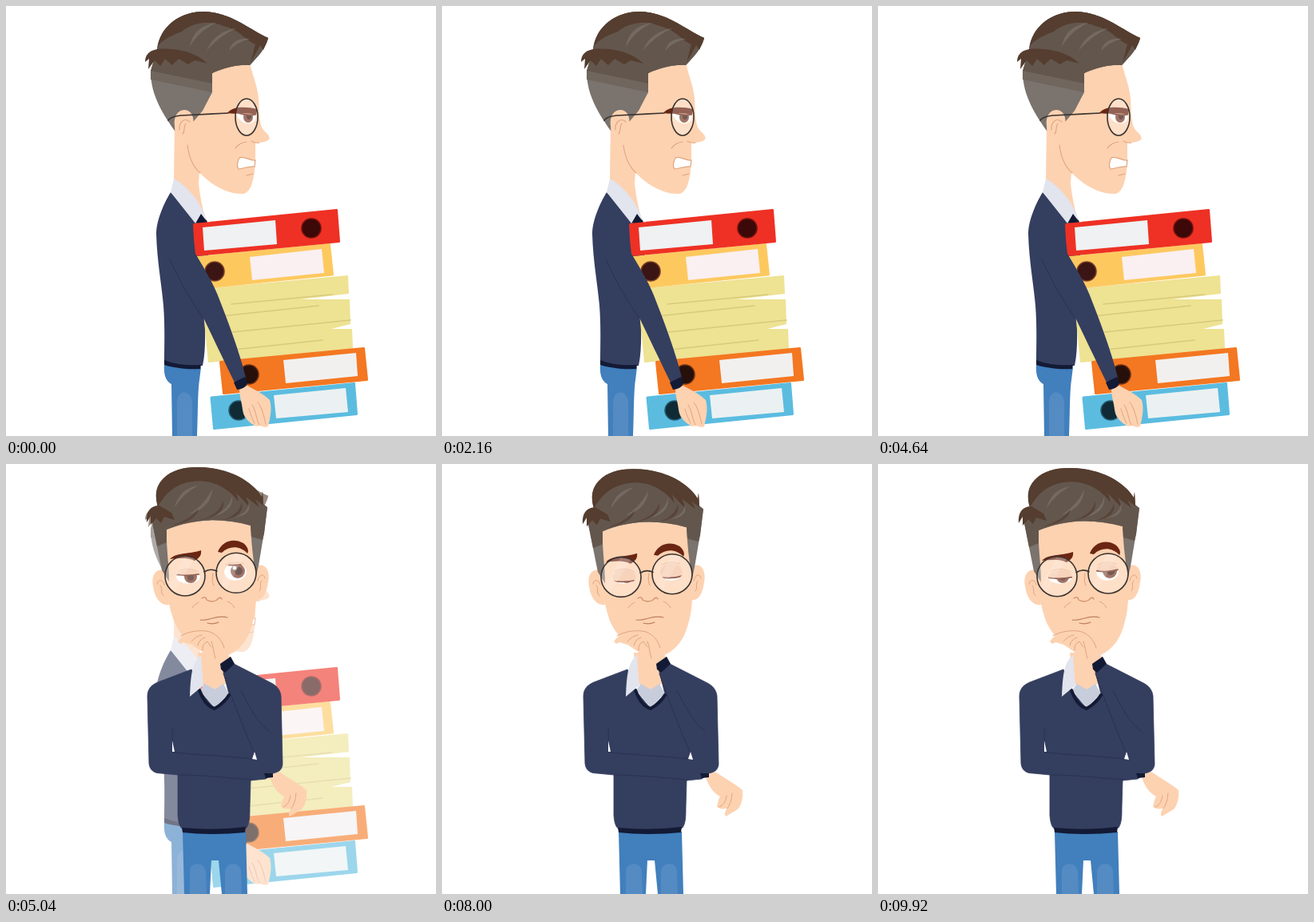
Write an HTML page that moves like this. It is 538 by 538 pixels and loops after 10 s.

```html
<!DOCTYPE html>
<html lang="en">
<head>
<meta charset="utf-8">
<title>Office worker</title>
<style>
html, body { margin: 0; width: 100%; height: 100%; overflow: hidden; background: #fff; }
svg { display: block; width: 100%; height: 100%; }
.line { fill: none; stroke-linecap: round; stroke-linejoin: round; }
</style>
</head>
<body>
<svg id="stage" viewBox="0 0 538 538"></svg>
<script>
const C = {
  skin: '#fdd2b1', crease: '#dfa47f', navy: '#343e5f', seam: '#29324f', trim: '#131a35',
  jeans: '#417fbd', knee: '#548bc3', collar: '#e2e4ee', hair: '#63564d', dark: '#553d2f',
  streak: '#746a62', side: '#7a736e', brow: '#6b2613', frame: '#3a322f', iris: '#7d3f2c', lid: '#f3c2a2'
};
const LOOP = 10000, HALF = 5000, STEP = 80;

const shape = (d, fill, more = '') => `<path d="${d}" fill="${fill}" ${more}/>`;
const line = (d, color, w = 1) => `<path class="line" d="${d}" stroke="${color}" stroke-width="${w}"/>`;
const oval = (x, y, rx, ry, fill, more = '') =>
  `<ellipse cx="${x}" cy="${y}" rx="${rx}" ry="${ry}" fill="${fill}" ${more}/>`;
const clip = (id, inner) => `<clipPath id="${id}">${inner}</clipPath>`;
const group = (inner, more = '') => `<g ${more}>${inner}</g>`;
const lens = (x, y, rx, ry) =>
  oval(x, y, rx, ry, '#fff', `fill-opacity=".28" stroke="${C.frame}" stroke-width="1.6"`);

function binder(box, color, label, paper, x, y, hole, rim) {
  return shape(box, color, `stroke="${color}" stroke-width="3" stroke-linejoin="round"`) +
    shape(label, paper) + oval(x, y, 12, 12, hole, `stroke="${rim}" stroke-width="1.6"`);
}

function carrier() {
  const body =
    shape('M198 449C197 461 200 470 207 473L208 538H239C240 510 240 480 242 468L244 452Z', C.jeans) +
    shape('M214 538V496C214 479 232 479 233 496V538Z', C.knee) +
    shape('M250 80L304 66C308 86 315 101 316 116C317 132 316 147 322 155C327 160 331 163 329 167C325 171 317 171 312 171L312 190L311 207C309 220 306 233 297 235C279 236 257 225 242 208L241 222C243 240 246 255 251 270L210 217L211 145L236 110Z', C.skin) +
    shape('M206 233C198 246 188 268 188 285C189 320 195 350 197 375C199 400 198 425 198 445C212 451 230 452 246 450C250 432 249 410 249 395L262 340L240 268Z', C.navy) +
    shape('M237 270L244 258L252 270L248 275Z', C.trim) +
    shape('M210 216C224 223 246 246 250 268L244 260L237 272L206 233Z', C.collar) +
    shape('M198 443C212 449 230 450 244 449L243 454C228 455 210 453 198 449Z', C.trim);

  const load =
    shape('M244 354L428 337L429 360L369 367L430 367L431 398L407 404L433 404L434 429L253 446Z', '#eee293') +
    line('M282 373L408 361M270 388L391 375M283 408L431 393M285 430L396 418', '#d8ca7c', 1.5) +
    binder('M239.5 314.5L404.5 298.5L408.5 336L251.5 352Z', '#fdc95f',
      'M305 314L395 304L398 334L308 343Z', '#faf0f1', 261, 332, '#3b1514', '#7b3c25') +
    binder('M235.5 273.5L413.5 255.5L416.5 294.5L237.5 311.5Z', '#ee3124',
      'M246 277L337 268L339 298L248 306Z', '#eff1f2', 382, 278, '#3c0908', '#74120f') +
    binder('M257 490L435.5 472.5L438.5 510.5L260.5 528.5Z', '#5bbce0',
      'M335 487L425 478L428 508L338 516Z', '#ebf1f2', 291, 506, '#102b36', '#245a70') +
    binder('M268.5 445.5L447.5 428.5L451.5 467.5L272.5 484.5Z', '#f47721',
      'M347 443L438 434L440 463L350 472Z', '#f2f0ef', 304, 461, '#27100a', '#6e3113');

  const arm =
    shape('M206 290L234 285L237 310C245 323 258 345 265 362C278 395 293 435 300 465L287 473C271 440 257 411 247 390Z', C.navy) +
    line('M205 317C215 340 232 370 247 391', C.seam) +
    shape('M292 479L302 475C311 480 323 486 330 493C333 504 331 513 328 526C323 529 319 523 313 526C303 521 297 514 296 505C295 495 292 489 292 479Z', C.skin) +
    line('M308 499C313 507 313 517 317 524M315 496C321 503 323 515 325 523M304 504C306 512 309 518 311 522', C.crease) +
    shape('M285 471L299 464L302 472C301 477 293 480 289 480Z', C.trim);

  const hair =
    shape('M189 55C192 25 218 7 248 7C284 9 303 29 328 40C325 53 316 62 305 74C288 73 272 78 258 84L258 108L246 131L235 144L211 156C197 136 181 112 181 82Z', C.side) +
    shape('M189 55C192 25 218 7 248 7C284 9 303 29 328 40C325 53 316 62 305 74C288 73 272 78 258 84L258 108L181 92L181 82Z', '#70665e') +
    shape('M189 55C192 25 218 7 248 7C284 9 303 29 328 40C325 53 316 62 305 74C288 73 272 78 258 84L258 97L181 81Z', C.hair) +
    shape('M190 50C195 24 219 7 248 7C284 9 303 29 328 40L322 55L318 49L306 71L312 48C300 43 293 30 272 25C252 16 230 23 220 32C211 35 197 41 190 50Z', C.dark) +
    shape('M189 54C179 56 174 61 174 70L179 66L178 79L186 68L193 75L199 66L208 74L216 66L228 73L236 68L252 72C237 57 211 52 189 54Z', C.dark) +
    shape('M230 51Q234 25 263 21Q240 32 230 51ZM251 56Q261 32 288 28Q266 38 251 56ZM279 56Q284 39 305 41Q289 45 279 56Z', C.streak);

  const eye = clip('sideEye', '<path d="M287 133L313 134C313 143 310 147 303 147C296 147 290 141 287 133Z"/>') +
    group(oval(300, 139, 16, 10, '#fff') + oval(303, 139, 6, 7, C.iris) + oval(304, 138, 3, 4, '#3a1a13') +
      group(shape('M284 105H316V135Q300 139 284 131Z', C.lid) + line('M284 131Q300 139 316 135', C.brow, 1.6), 'id="sideLid"'),
      'clip-path="url(#sideEye)"');

  const face =
    shape('M211 150C209 138 216 129 224 130C233 131 236 140 234 152C232 163 228 171 222 170C214 168 211 160 211 150Z', C.skin) +
    line('M217 155C216 145 224 139 230 145M225 147C221 152 225 156 221 160M227 174C229 190 235 202 243 209M287 178Q292 171 301 170M307 169Q312 172 317 171M301 212L309 210', C.crease, 1.1) +
    shape('M292 190C298 187 305 194 312 193L311 201C305 200 298 203 291 204C288 200 290 194 292 190Z', '#fff', `stroke="${C.crease}" stroke-width="1.2"`) +
    eye +
    shape('M277 134C284 125 301 126 314 129L313 136C300 133 287 136 277 134Z', C.brow) +
    line('M203 143C206 138 213 138 218 137L278 134', C.frame, 1.7) +
    lens(301, 139, 14, 23);

  return body + load + arm + hair + face;
}

function thinker() {
  const body =
    shape('M221 460H300L302 538H270L266 496H257L255 538H223Z', C.jeans) +
    shape('M230 538V510C230 497 249 497 250 510L251 538ZM274 538V510C275 497 294 497 294 510L295 538Z', C.knee) +
    shape('M240 236H277V272L262 288L243 272Z', C.skin) +
    shape('M232 257L190 273C181 277 177 282 177 291L179 375C180 383 185 387 194 387L215 389L215 440C216 451 218 455 222 457C250 460 280 459 301 455C305 449 305 440 305 430L306 396L325 394L334 387C343 386 346 380 346 375L344 290C343 282 338 277 332 274L285 250L271 256L279 288L261 306L241 282Z',
      C.navy, `stroke="${C.navy}" stroke-width=".8"`) +
    shape('M243 283L249 275L261 282L272 275L279 288L261 305Z', '#c8cddb') +
    line('M242 283C247 297 254 304 261 306C268 302 275 296 279 289', C.trim, 4) +
    shape('M244 239C234 248 231 259 230 291L247 277L245 255Z', C.collar) +
    line('M272 262C282 292 299 335 311 362M294 283C306 308 318 327 329 334M211 361C240 364 285 366 307 369M216 389C245 389 280 393 307 395M209 361L208 331', C.seam) +
    shape('M208 346L208 360H211ZM311 360L308 369L314 370Z', '#fff') +
    shape('M220 455Q260 459 300 454L299 461Q260 465 221 461Z', C.trim) +
    shape('M330 392C337 385 342 384 345 387C355 394 368 401 376 408C377 418 374 428 370 432L355 441C353 438 354 434 357 431C350 432 345 431 344 428C346 422 346 418 348 416C340 412 334 404 330 392Z', C.skin) +
    line('M357 431C362 424 362 418 363 412M347 429C354 426 355 420 356 415', C.crease) +
    shape('M323 387L334 387L334 392L325 393Z', C.trim);

  const head =
    shape('M202 135C188 127 181 140 184 153C186 168 194 178 204 176ZM312 129C324 121 331 134 328 148C326 162 321 172 312 170Z', C.skin) +
    line('M189 150C190 143 197 145 198 151M193 152C197 156 192 160 197 165M324 143C322 135 316 140 315 146M320 146C316 150 321 154 317 159', C.crease) +
    shape('M199 78C230 62 285 62 308 77L314 130C314 165 313 185 308 200C302 225 286 239 268 242C240 238 215 215 208 190C203 175 200 152 200 132Z', C.skin);

  const hair =
    shape('M181 66L184 78L195 133L204 147C204 125 200 100 201 82C235 68 270 67 306 77C307 95 308 113 313 140L316 127L323 85L327 54Z', C.side) +
    shape('M190 54C186 40 187 28 197 18C207 8 222 4 238 4C272 3 306 18 320 41L321 34L322 50L327 54L323 87L321 95L307 91L306 77C270 67 235 68 201 82L201 98L189 103L184 78L181 63Z', C.hair) +
    shape('M190 53C186 40 187 28 197 18C207 8 222 4 238 4C272 3 306 18 320 41L321 34L322 52L312 44L317 54L300 41L306 55L288 36L291 47C277 28 255 18 232 22C212 25 200 36 190 53Z', C.dark) +
    shape('M192 52C180 52 175 60 176 73L181 65L181 76L188 68L194 74L198 66L211 70L207 61Z', C.dark) +
    shape('M211 54Q217 31 240 27Q221 38 211 54ZM229 63Q249 51 258 31Q257 54 229 63ZM257 66Q280 57 283 39Q286 60 257 66ZM285 67Q304 61 304 47Q309 64 285 67Z', C.streak) +
    shape('M207 77Q230 70 241 56Q238 72 207 77ZM242 70Q267 64 272 46Q274 66 242 70ZM272 70Q292 63 295 48Q299 65 272 70Z', C.dark, 'opacity=".7"');

  const brows = shape('M205 119C213 110 231 113 244 108C245 115 241 118 236 121C226 116 215 118 205 119ZM265 110C270 96 285 92 297 99C303 104 304 109 302 112C293 102 279 102 270 111Z', C.brow);

  const eyes =
    clip('eyeL', oval(228, 141, 15, 9, '#000')) + clip('eyeR', oval(287, 135, 14, 11, '#000')) +
    group(oval(228, 141, 15, 9, '#fff') + oval(231, 141, 8, 8, C.iris) + oval(231, 142, 4, 4, '#4a2018') +
      group(shape('M210 112H246V137Q228 141 210 138Z', C.lid) + line('M210 138Q228 141 246 137', C.brow, 1.8), 'id="lidL"'),
      'clip-path="url(#eyeL)"') +
    group(oval(287, 135, 14, 11, '#fff') + oval(290, 134, 9, 9, C.iris) + oval(291, 134, 5, 5, '#3a1a13') + oval(286, 130, 2.5, 2.5, '#fff') +
      group(shape('M270 96H304V123Q287 129 270 125Z', C.lid) + line('M270 125Q287 129 304 123', C.brow, 1.8), 'id="lidR"'),
      'clip-path="url(#eyeR)"') +
    line('M216 134Q229 128 241 135M275 126Q286 120 298 125', C.crease, .8);

  const face =
    line('M259 137Q257 146 260 152M233 180Q235 176 241 173M277 172Q284 175 286 180', C.crease) +
    line('M245 168Q250 165 251 170Q258 174 264 170Q268 165 270 169', '#cf946d', 1.4) +
    line('M243 195C255 197 262 188 277 192M252 199Q259 201 266 198', '#bd7f5b', 1.2);

  const glasses =
    lens(224, 140, 25, 25) + lens(288, 136.3, 25, 25) +
    shape('M223 116L236 118L211 159L204 153ZM286 112L299 114L276 156L269 150Z', '#fff', 'opacity=".16"') +
    line('M248 135Q256 130 264 134', C.frame, 1.6);

  const hand =
    shape('M215 222C222 212 235 208 250 209C262 210 272 220 274 232L281 243L269 252L262 243C255 244 248 240 245 234C243 231 236 228 232 226L222 223Q218 227 215 222Z', C.skin) +
    line('M219 215C229 209 242 208 250 209C261 210 270 219 273 230M232 222Q238 215 245 214M240 227Q241 220 249 217M246 233Q245 225 252 222L257 229M257 222C260 229 259 235 262 243', C.crease) +
    shape('M268 250L281 241L286 250L274 261L269 257Z', C.trim);

  return body + head + group(hair, 'id="hair"') + eyes + group(brows, 'id="brows"') + face +
    group(glasses, 'id="glasses"') + hand;
}

const $ = id => document.getElementById(id);
$('stage').innerHTML = group(carrier(), 'id="carrier"') + group(thinker(), 'id="thinker"');

// Both poses blink every two seconds.
const BLINK = [[840, 0], [1000, 1], [1240, 0]];
const BOB = [[840, 0], [1000, 1], [1240, 0], [1320, 0], [1480, -.6], [1800, 0]];

function at(keys, t) {
  if (t <= keys[0][0]) return keys[0][1];
  for (let i = 1; i < keys.length; i++) {
    const [a, p] = keys[i - 1], [b, q] = keys[i];
    if (t <= b) return p + (q - p) * (t - a) / (b - a);
  }
  return keys[keys.length - 1][1];
}
const drop = (id, y) => $(id).setAttribute('transform', `translate(0 ${y.toFixed(2)})`);

function draw(time) {
  const t = Math.floor(time % LOOP / STEP) * STEP;
  const phase = t % HALF % 2000;
  const shut = at(BLINK, phase), bob = at(BOB, phase);
  $('carrier').setAttribute('opacity', at([[4960, 1], [5160, 0]], t));
  $('thinker').setAttribute('visibility', t < HALF ? 'hidden' : 'visible');
  drop('sideLid', shut * 10);
  drop('lidL', shut * 8);
  drop('lidR', shut * 16);
  drop('hair', bob * 2.2);
  drop('brows', bob * 3.8);
  drop('glasses', bob * 1.4);
}

const start = performance.now();
function tick() {
  draw(performance.now() - start);
  requestAnimationFrame(tick);
}
tick();
</script>
</body>
</html>
```
